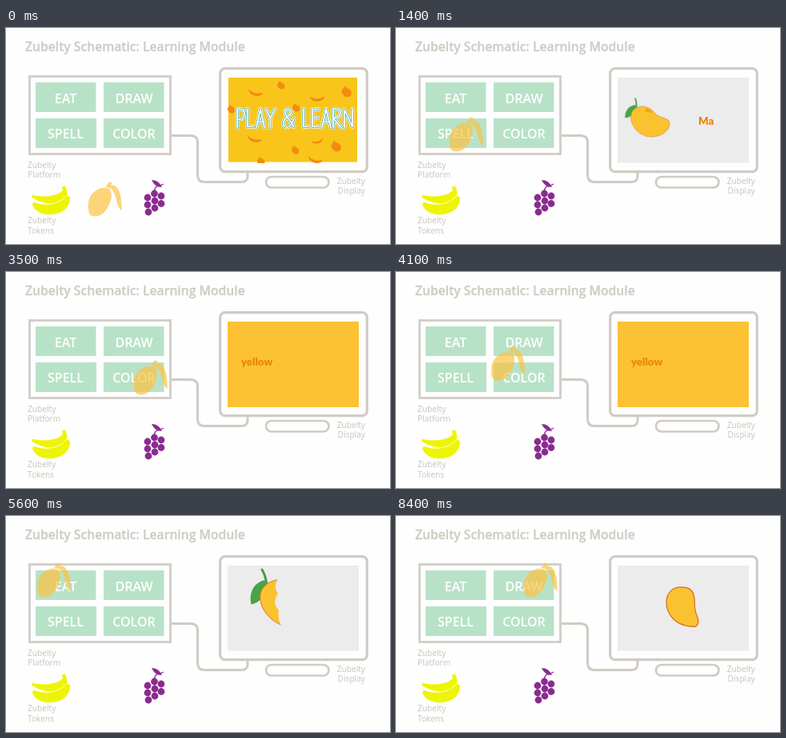
Animation of 480 by 270 pixels, one loop 8700 ms. Source, as an HTML page:

```html
<!DOCTYPE html>
<html lang="en">
<head>
<meta charset="utf-8">
<title>Learning Module</title>
<style>
  html, body { margin: 0; width: 100%; height: 100%; overflow: hidden; background: #fefefe; }
  svg { display: block; width: 100vw; height: 100vh; font-family: "Open Sans", sans-serif; }

  .frame { fill: none; stroke: #d0ccc4; }
  .title { font-size: 15.7px; font-weight: 600; fill: #cfccc4; stroke: #cfccc4; stroke-width: .3px; }
  .label { font-size: 10.2px; fill: #c8c4bb; }
  .tiles rect { fill: #b8e2c8; }
  .tiles text { font-size: 16px; font-weight: 600; fill: #fff; text-anchor: middle; }
  .word { font: 900 13.2px Lato, sans-serif; fill: #e9850c; }
  .lettering { fill: none; stroke-linecap: round; stroke-linejoin: round; }

  /* One loop is 8.7 s, so 1% is 87 ms. */
  .token, .scene, .zoom, .line { animation: 8.7s linear infinite; }
  .token { opacity: .7; animation-name: token; }
  .scene { animation-timing-function: step-end; }
  .intro { animation-name: intro; }
  .spell { animation-name: spell; }
  .color { animation-name: color; animation-timing-function: linear; }
  .eat   { animation-name: eat; }
  .draw  { animation-name: draw; }
  .zoom  { transform-origin: 354px 102.5px; animation-name: zoom; }
  .line  { stroke-dasharray: 100 110; animation-name: line; }

  /* Parts that appear at --at and stay until their scene ends. */
  .cue { fill-opacity: 0; animation: cue 8.7s step-end var(--at) infinite; }

  @keyframes token {
    0%, 2.3% { transform: none; animation-timing-function: ease-in-out; }
    9.2%, 29.9% { transform: translate(-36px, -81px); animation-timing-function: ease-in-out; }
    34.5%, 44.8% { transform: translate(57px, -82px); animation-timing-function: ease-in-out; }
    50.6%, 65.5% { transform: translate(-64px, -134px); animation-timing-function: ease-in-out; }
    71.2%, 100% { transform: translate(57px, -134px); }
  }
  @keyframes intro { 0% { opacity: 1; } 10.3%, 100% { opacity: 0; } }
  @keyframes spell { 0% { opacity: 0; } 10.3% { opacity: 1; } 33.3%, 100% { opacity: 0; } }
  @keyframes color {
    0%, 33.3% { opacity: 0; transform: none; }
    33.31%, 48.3% { opacity: 1; transform: none; animation-timing-function: ease-out; }
    53% { opacity: 1; transform: translateY(-104px); }
    54%, 55% { opacity: .25; transform: translateY(-104.5px); }
    55.1%, 100% { opacity: 0; transform: translateY(-104.5px); }
  }
  @keyframes eat { 0% { opacity: 0; } 48.2% { opacity: 1; } 67.8%, 100% { opacity: 0; } }
  @keyframes draw { 0% { opacity: 0; } 71.2%, 100% { opacity: 1; } }
  @keyframes zoom { 0%, 10.3% { transform: scale(.88); } 28.7%, 100% { transform: scale(1); } }
  @keyframes line {
    0%, 71.2% { stroke-dashoffset: 100; fill-opacity: 0; }
    85%, 87.4% { stroke-dashoffset: 0; fill-opacity: 0; }
    94%, 100% { stroke-dashoffset: 0; fill-opacity: 1; }
  }
  @keyframes cue { 0% { fill-opacity: 1; } 30%, 100% { fill-opacity: 0; } }
</style>
</head>
<body>
<svg viewBox="0 0 480 270">
  <defs>
    <clipPath id="screen"><rect x="277" y="62" width="164" height="106.5"/></clipPath>

    <g id="mango">
      <path d="M326 90Q326 77 320 67" fill="none" stroke="#439f45" stroke-width="3" stroke-linecap="round"/>
      <path d="M323.500 80C311 83 303 94 306.500 110.500C320 108 327 94 323.500 80Z" fill="#47a447"/>
      <path d="M324 87C334 77 352 77.500 364 87.500C374 97 388 94 396 98C404 104 401 117 394 125C386 134 373 139.500 359 140C342 138 327 129 320 113C316 102 317 93 324 87Z" fill="#fbc230" stroke="#dd7424" stroke-width="1"/>
      <path d="M345 83C351 81 358 84 361 89C357 91 353 90 350 90C346 91 343 86 345 83Z" fill="#f3a90c"/>
    </g>

    <path id="bananaBit" d="M-9-3Q-2 5 9 2Q8 6 1 6Q-8 5-9-3Z"/>
    <path id="mangoBit" d="M-4-2L-2-5L0-3Q6-1 4 4Q0 8-4 3Q-6 0-4-2Z"/>

    <g id="letters">
      <path d="M289 125V102Q299 101 298 109Q297 115 289 115"/>
      <path d="M302 102V124H310"/>
      <path d="M313 125L318 102L323 125M315 118H322"/>
      <path d="M325 102L330.500 113L336 102M330.500 113V125"/>
      <path d="M360 124L349 108Q348 102 353 102Q358 103 356 108L349 114Q344 121 349 124Q355 127 360 114"/>
      <path d="M372 102V124H379"/>
      <path d="M391 102H383V124H391M383 113H390"/>
      <path d="M395 125L400 102L406 125M397 118H404"/>
      <path d="M409 125V102Q419 101 418 108Q417 113 409 113L419 125"/>
      <path d="M423 125V103L433 124V102"/>
    </g>
  </defs>

  <text class="title" x="24" y="28.500">Zubelty Schematic: Learning Module</text>

  <g class="frame">
    <rect x="29.500" y="60.500" width="176" height="97" stroke-width="2.700"/>
    <path d="M207 134.500H231Q239.500 134.500 239.500 143V184Q239.500 192.500 248 192.500H294Q302 192.500 302 185V180" stroke-width="3"/>
    <rect x="267.700" y="50.700" width="183.600" height="129" rx="6" stroke-width="3.200"/>
    <rect x="325" y="186" width="78.500" height="13.500" rx="6.700" stroke-width="2.700"/>
  </g>

  <g class="label">
    <text x="27" y="175">Zubelty</text>
    <text x="27" y="187">Platform</text>
    <text x="27" y="244">Zubelty</text>
    <text x="27" y="257">Tokens</text>
    <g text-anchor="end">
      <text x="449" y="195">Zubelty</text>
      <text x="449" y="207">Display</text>
    </g>
  </g>

  <g class="tiles">
    <rect x="37" y="68" width="75.500" height="37"/>
    <rect x="122" y="68" width="75.500" height="37"/>
    <rect x="37" y="113" width="76" height="37"/>
    <rect x="122" y="113" width="75.500" height="37"/>
    <text x="74.500" y="94">EAT</text>
    <text x="160" y="94">DRAW</text>
    <text x="74.500" y="138">SPELL</text>
    <text x="160" y="138">COLOR</text>
  </g>

  <!-- Banana and grapes -->
  <g fill="#eef406" stroke="#fefefe" stroke-width=".8">
    <path d="M69.500 198L74.500 197C76 202 78 207 76 211C68 222 49 223 32 212L32 208C46 212 64 210 70.500 203Z"/>
    <path d="M76 209L80.500 211C81 226 68 234.500 52 233.500C43 233 36 229 32.500 221L34.500 217C48 223 67 221 76 209Z"/>
  </g>
  <g fill="#8a2b90">
    <path d="M182 190Q191 190 195 199Q186 199 182 190Z"/>
    <path d="M185 204Q187 197 190 198L197 195" fill="none" stroke="#8a2b90" stroke-width="1.200"/>
    <circle cx="177" cy="212" r="4.400"/>
    <circle cx="185.500" cy="207" r="4.400"/>
    <circle cx="194" cy="210" r="4.400"/>
    <circle cx="186" cy="216" r="4.400"/>
    <circle cx="177" cy="221" r="4.400"/>
    <circle cx="194" cy="219.500" r="4.400"/>
    <circle cx="186" cy="225" r="4.400"/>
    <circle cx="178" cy="230" r="4.400"/>
  </g>

  <g clip-path="url(#screen)">
    <rect x="277" y="62" width="164" height="107" fill="#ececec"/>

    <g class="scene spell">
      <g transform="translate(315 113) rotate(11) scale(.65) translate(-354 -102.500)"><g class="zoom"><use href="#mango"/></g></g>
      <text class="word" x="378" y="121"><tspan class="cue" style="--at:1.2s">M</tspan><tspan class="cue" style="--at:1.4s">a</tspan><tspan class="cue" style="--at:1.6s">n</tspan><tspan class="cue" style="--at:1.8s">g</tspan><tspan class="cue" style="--at:2s">o</tspan></text>
    </g>

    <g class="scene eat">
      <use href="#mango"/>
      <g fill="#ececec">
        <path class="cue" style="--at:5s" d="M405 90H380Q374 99 381 105Q377 114 386 118Q389 126 405 124Z"/>
        <path class="cue" style="--at:5.3s" d="M410 76H364Q350 88 358 98Q351 110 361 118Q357 130 368 142H410Z"/>
        <path class="cue" style="--at:5.6s" d="M410 74H344Q332 86 340 97Q332 108 341 118Q338 130 348 144H410Z"/>
        <path class="cue" style="--at:5.8s" d="M300 62H410V145H300Z"/>
      </g>
    </g>

    <g class="scene color">
      <rect x="277" y="62" width="164" height="107" fill="#fcc233"/>
      <text class="word" x="294" y="117"><tspan class="cue" style="--at:3s">y</tspan><tspan class="cue" style="--at:3.1s">e</tspan><tspan class="cue" style="--at:3.2s">l</tspan><tspan class="cue" style="--at:3.3s">l</tspan><tspan class="cue" style="--at:3.4s">o</tspan><tspan class="cue" style="--at:3.5s">w</tspan></text>
    </g>

    <g class="scene draw">
      <path class="line" pathLength="100" fill="#fbc230" stroke="#d9702c" stroke-width="1.300" d="M358 89C346 88 338 96 338 108C338 117 342 124 347 129C355 137 368 139 375 138C379 135 378 129 376 124C372 116 374 110 373 103C372 93 366 89 358 89Z"/>
    </g>

    <g class="scene intro">
      <rect x="277" y="62" width="164" height="107" fill="#fefefe"/>
      <rect x="278" y="62" width="161" height="105.500" fill="#f9c51a"/>
      <g fill="#f28c10">
        <use href="#bananaBit" x="312" y="79"/>
        <use href="#mangoBit" x="344" y="71"/>
        <use href="#bananaBit" transform="translate(389 86) rotate(-15)"/>
        <use href="#mangoBit" transform="translate(426 79) scale(1.300)"/>
        <use href="#mangoBit" x="282" y="101"/>
        <use href="#mangoBit" x="363" y="99"/>
        <use href="#bananaBit" x="311" y="137"/>
        <use href="#mangoBit" x="362" y="152"/>
        <use href="#bananaBit" transform="translate(389 140) rotate(-30) scale(.800)"/>
        <use href="#mangoBit" transform="translate(413 147) scale(1.300)"/>
        <use href="#mangoBit" x="319" y="166"/>
        <use href="#bananaBit" x="387" y="163"/>
      </g>
      <g class="lettering" role="img" aria-label="PLAY &amp; LEARN" transform="translate(0 -.700)">
        <use href="#letters" stroke="#fff" stroke-width="4.800"/>
        <use href="#letters" stroke="#45a58b" stroke-width="3.300"/>
        <use href="#letters" stroke="#fff" stroke-width="1.800"/>
      </g>
    </g>
  </g>

  <g class="token" fill="#fdc240">
    <path d="M108 207C114 200 124 197.500 130 202C134 208 131 222 122 231C116 237 105 237 103.500 230C102 221 103 212 108 207Z"/>
    <path d="M124 199L129 192.500L132.500 193L131.500 196.500C140 195 145.500 208 144.500 228C140 225 139 219 137.500 213C136 207 134 203 131 200.500Z"/>
  </g>
</svg>
</body>
</html>
```
